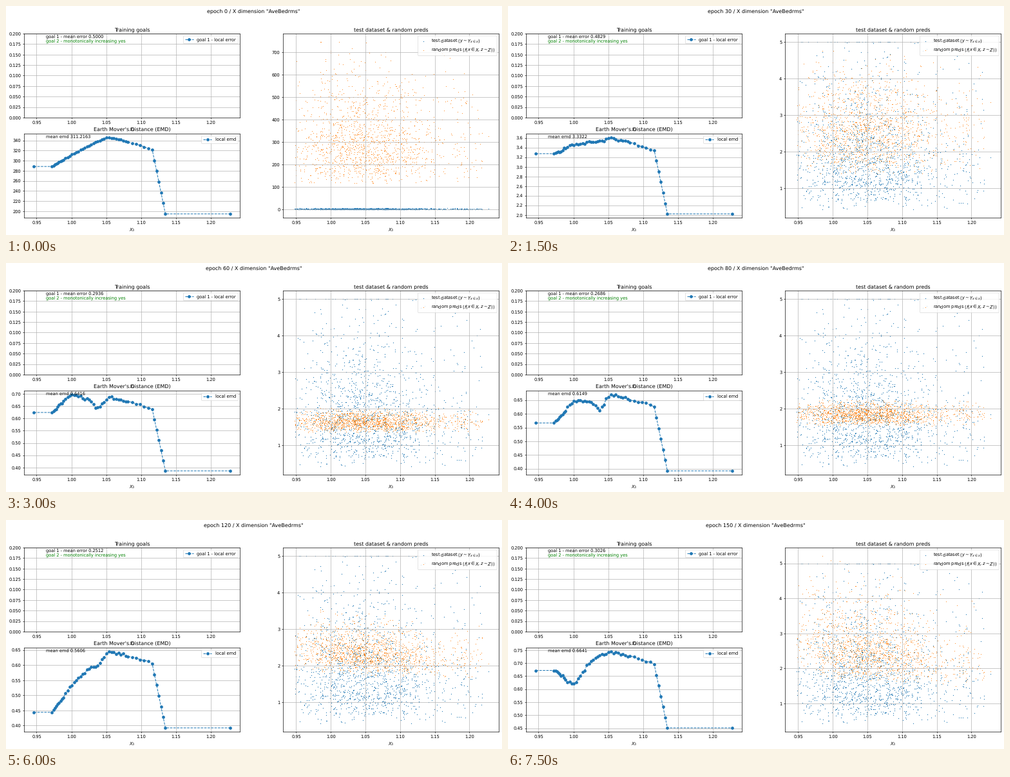
Recreate the animation shown at these times as a matplotlib script. Size 770 by 357 pixels, loop 8000 ms.

```python
import numpy as np
import matplotlib.pyplot as plt
from matplotlib.animation import FuncAnimation

W, H, DPI = 770, 357, 48.125
FRAMES, INTERVAL, STEP = 16, 500, 10
N = 1450
MODE, LEFT, EDGE, FOOT = 1.053, .9722, 1.1159, 1.1348

plt.rcParams.update({
    "font.family": "DejaVu Sans", "font.size": 10, "text.hinting": "none",
    "axes.linewidth": 1.0, "grid.linewidth": 1.0,
    "xtick.major.width": 1.0, "ytick.major.width": 1.0,
})

# Training state at a few epochs
KEYS = [0, 20, 40, 60, 100, 120, 150]
ERROR = [.5, .4996, .4663, .2936, .2436, .2512, .3026]
MEAN_EMD = [311.2163, 8.4879, 1.3082, .6416, .5893, .5606, .6641]
PEAK_EMD = [346, 9.47, 1.365, .686, .654, .645, .742]
SAG = [.38, .42, 0, .23, .55, .8, .2]
BUMP = [0, 0, .08, .17, .1, .03, -.29]
NOTCH = [0, 0, -.04, -.12, -.17, -.08, 0]
MEDIAN = [290, 9.6, .7, 1.65, 2.08, 2.35, 2.55]
SPREAD = [.42, .39, .15, .09, .085, .13, .19]


def at(epoch, track):
    return np.interp(epoch, KEYS, track)


def log_at(epoch, track):
    return np.exp(at(epoch, np.log(track)))


def bell(x, mid, width):
    return np.exp(-.5 * ((x - mid) / width) ** 2)


# Centres of the local windows
emd_x = np.interp(np.arange(52), [0, 1, 9, 28, 38, 44, 50, 51],
                  [.9463, LEFT, .9884, 1.047, 1.0812, EDGE, FOOT, 1.2273])


def local_emd(epoch):
    """Lopsided hump with a bump and a notch, then a straight drop."""
    x = np.clip(emd_x, LEFT, EDGE)
    rise = np.maximum(MODE - x, 0) / (MODE - LEFT)
    fall = np.maximum(x - MODE, 0) / (EDGE - MODE)
    shape = (1 - at(epoch, SAG) * rise ** 1.2 - .16 * fall ** 1.25
             + at(epoch, BUMP) * bell(x, 1.0, .014)
             + at(epoch, NOTCH) * bell(x, 1.038, .006))
    rough = .015 if epoch > 20 else .005
    noise = np.random.default_rng(epoch + 1).uniform(-rough, rough, x.size)
    shape += np.where((x > LEFT) & (x < EDGE), noise, 0)
    shape *= np.interp(emd_x, [EDGE, FOOT], [1, 0])
    peak = log_at(epoch, PEAK_EMD)
    low = peak * np.interp(epoch, [60, 100], [.563, .608])
    return low + (peak - low) * shape


# Test dataset: broad core, thin right tail, values capped at 5
rng = np.random.default_rng(3)
data_x = rng.normal(1.04, .05, N)
stray = (data_x < .947) | (data_x > 1.15)
data_x[stray] = rng.uniform(.948, 1.12, stray.sum())
tail = rng.random(N) < .11
data_x[tail] = 1.1 + .118 * rng.random(tail.sum()) ** 1.2
data_y = np.minimum(np.exp(rng.normal(np.log(1.82), .54, N)), 5)
data_y = np.where(data_y < .43, rng.uniform(.43, 1.2, N), data_y)
data_x[:2] = .985, 1.2273
data_y[:2] = .43, 1.85


def predictions(epoch):
    late = max(0, epoch - 100) / 50
    z = np.random.default_rng(100 + epoch).normal(size=N)
    z = np.where(np.abs(z) > 2.25, z / 2, z)
    z[0] = 2.25
    power = (at(epoch, SPREAD) * z + .046 * late * np.maximum(z, 0) ** 2
             - late * (data_x - 1.04))
    return log_at(epoch, MEDIAN) * np.exp(power)


fig = plt.figure(figsize=(16, 7.4182), dpi=DPI, facecolor="white")


def panel(x0, y0, x1, y1, title, xlim):
    ax = fig.add_axes([x0 / W, 1 - y1 / H, (x1 - x0) / W, (y1 - y0) / H])
    ax.set_title(title, fontsize=12)
    ax.set_xlabel("$X_3$")
    ax.set_xlim(*xlim)
    ax.grid(True)
    return ax


def note(ax, y, text="", color="black"):
    return ax.text(.1, y, text, color=color, transform=ax.transAxes)


def fit_y(ax, *series):
    lo, hi = min(map(np.min, series)), max(map(np.max, series))
    pad = .05 * (hi - lo)
    ax.set_ylim(lo - pad, hi + pad)


LEFT_XLIM = (.9320, 1.2416)
goals = panel(28, 43, 363, 174, "Training goals", LEFT_XLIM)
goals.plot([], [], "o--", label="goal 1 - local error")
goals.set_ylim(0, .2)
err_text = note(goals, .95)
note(goals, .9, "goal 2 - monotonically increasing yes", "green")

emd = panel(28, 199, 363, 330, "Earth Mover's Distance (EMD)", LEFT_XLIM)
emd_line, = emd.plot(emd_x, local_emd(0), "o--", label="local emd")
emd_text = note(emd, .95)

cloud = panel(430, 43, 765, 330, "test dataset & random preds", (.931, 1.2423))
cloud.scatter(data_x, data_y, s=3.4, lw=0,
              label=r"test dataset ($y \sim Y_{x \in x}$)")
preds = cloud.scatter(data_x, predictions(0), s=1.9, lw=0,
                      label=r"random preds ($f(x \in X, z \sim Z)$)")

for ax in (goals, emd, cloud):
    ax.legend(loc="upper right")

head = fig.text(.4995, 1 - 8.5 / H, "", fontsize=12, ha="center", va="center")


def update(i):
    epoch = i * STEP
    head.set_text(f'epoch {epoch} / X dimension "AveBedrms"')
    err_text.set_text(f"goal 1 - mean error {at(epoch, ERROR):.4f}")
    emd_text.set_text(f"mean emd {log_at(epoch, MEAN_EMD):.4f}")

    dist = local_emd(epoch)
    emd_line.set_ydata(dist)
    fit_y(emd, dist)

    guess = predictions(epoch)
    preds.set_offsets(np.column_stack([data_x, guess]))
    fit_y(cloud, guess, data_y)
    return head, err_text, emd_text, emd_line, preds


anim = FuncAnimation(fig, update, frames=FRAMES, interval=INTERVAL,
                     repeat=True, repeat_delay=0, blit=False)
plt.show()
```
